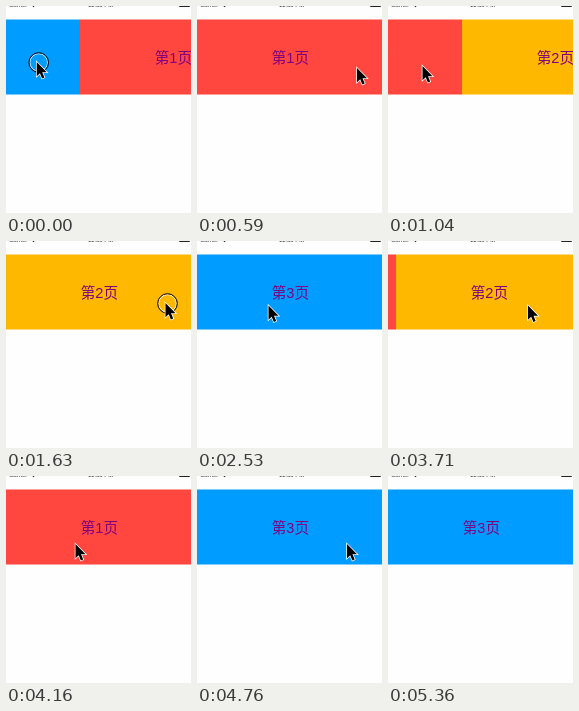
An HTML page for the animation above (5810 ms loop, 185 px wide and 207 px high).

```html
<!DOCTYPE html>
<html lang="zh">
<head>
<meta charset="utf-8">
<style>
  html, body { margin: 0; width: 100%; height: 100%; overflow: hidden; background: #fefefe; }
  svg { display: block; width: 100%; height: 100%; }
  .label { font: 14.6px "Liberation Sans", "Noto Sans CJK SC", "Noto Sans CJK", sans-serif; fill: #800080; text-anchor: middle; }
  .status { font: 6px "Liberation Sans", Arial, sans-serif; fill: #222; }
</style>
</head>
<body>
<svg viewBox="0 0 185 207">
  <g class="status">
    <text x="3" y="1.3">Carrier</text>
    <path d="M25.5 -1h4L27.5 1.3Z"/>
    <text x="82" y="1.3">11:38 PM</text>
    <rect x="173" y="-3" width="11" height="4" rx="1"/>
  </g>
  <g id="strip"></g>
  <g id="pointer">
    <g id="ring" fill="none">
      <circle cx="2" cy=".5" r="8.800" stroke="#fff" stroke-opacity=".8"/>
      <circle cx="2" cy=".5" r="9.800" stroke="#000"/>
    </g>
    <path d="M0 0V14.200L3.200 11.200 5.400 16.400 7.700 15.400 5.500 10.300H10Z"
          stroke="#fff" stroke-width="1.500" paint-order="stroke"/>
  </g>
</svg>
<script>
const LOOP = 5810, STEP = 148.9, W = 185;
const SETTLE = 500, TRAVEL = 300, REST = 250, PRESS = 90, EXIT = 5350;
const $ = id => document.getElementById(id);
const strip = $('strip'), pointer = $('pointer'), ring = $('ring');

const pages = [[3, '#009cff'], [1, '#ff463f'], [2, '#ffb800'], [3, '#009cff']];
strip.innerHTML = pages.map(([n, color], i) => `
  <rect x="${i * W}" y="13.5" width="${W}" height="75" fill="${color}"/>
  <text class="label" x="${i * W + 93.4}" y="56.5">第${n}页</text>`).join('');

// The pointer drags from one point to another during hold; the page settles after it.
const swipes = [
  { start: -283, hold: 290, from: [160, 57], to: [30.5, 56] },
  { start: 759, hold: 200, from: [160, 62], to: [34.5, 60] },
  { start: 1640, hold: 300, from: [159.5, 62], to: [2, 64] },
  { start: 2780, hold: 200, from: [71.5, 64.5], to: [150, 65] },
  { start: 3660, hold: 55, from: [72, 65], to: [140, 64.5] },
  { start: 4270, hold: 200, from: [69.5, 68], to: [150, 68] }
];
const leave = { start: 5460, hold: 1, from: [145, 173], to: [145, 173] };
const stops = [...swipes, leave];

function ease(u) {
  u = Math.min(1, Math.max(0, u));
  return u * u * (3 - 2 * u);
}
const mix = (a, b, f) => a.map((v, i) => v + (b[i] - v) * f);

function scrollAt(t) {
  const page = swipes.reduce((sum, { start, from, to }) =>
    sum + Math.sign(from[0] - to[0]) * ease((t - start) / SETTLE), 0);
  return Math.round(page * W);
}

function cursorAt(t) {
  const setOff = s => s.start - REST - TRAVEL;
  const i = stops.filter(s => t >= setOff(s)).length - 1;
  const s = stops[i];
  if (t >= s.start) return mix(s.from, s.to, ease((t - s.start) / s.hold));
  return mix(stops[i - 1].to, s.from, ease((t - setOff(s)) / TRAVEL));
}

const show = (el, on) => el.setAttribute('display', on ? 'inline' : 'none');

function draw(now) {
  const t = Math.min(36, Math.floor((now % LOOP + 15) / STEP)) * STEP;
  const [x, y] = cursorAt(t);
  strip.setAttribute('transform', `translate(${-scrollAt(t)} 0)`);
  pointer.setAttribute('transform', `translate(${x} ${y})`);
  show(pointer, t < EXIT);
  show(ring, swipes.some(s => t >= s.start - PRESS && t < s.start + s.hold));
}

const begin = performance.now();
function loop() {
  draw(performance.now() - begin);
  requestAnimationFrame(loop);
}
loop();
</script>
</body>
</html>
```
